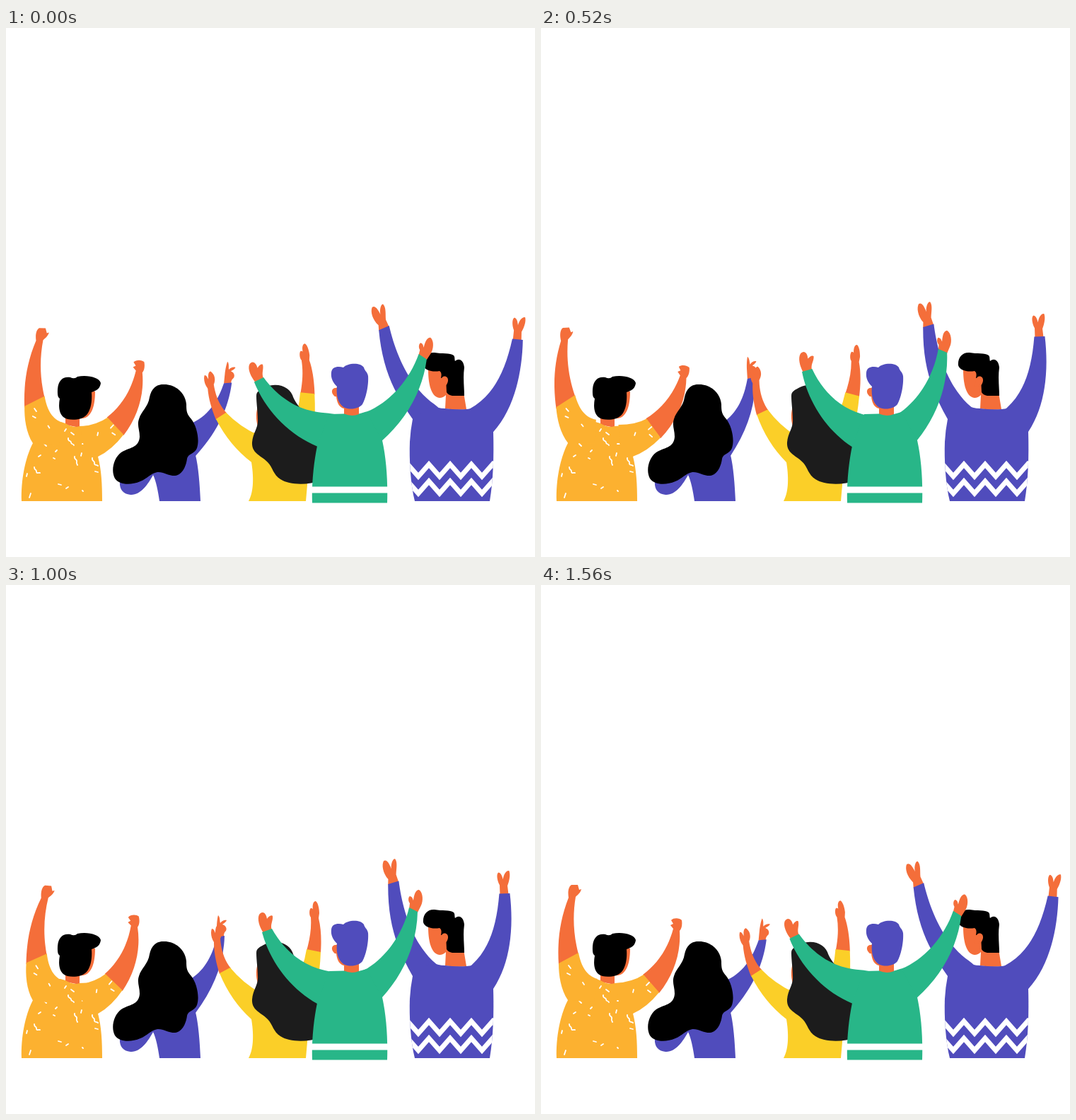
An HTML page for the animation above (1600 ms loop, 748x748 px).

```html
<!DOCTYPE html>
<html lang="en">
<head>
<meta charset="utf-8">
<title>Cheering crowd</title>
<style>
  html, body { margin: 0; width: 100%; height: 100%; overflow: hidden; background: #fff; }
  svg { display: block; width: 100vw; height: 100vh; }
  .skin { fill: #f46e3a; }
  .amber { fill: #fcb130; }
  .purple { fill: #504cbc; }
  .yellow { fill: #fbcf28; }
  .green { fill: #28b688; }
  .dark { fill: #1c1c1c; }
  .confetti { fill: none; stroke: #fff; stroke-width: 1.8; stroke-linecap: round; }
  .zigzag { fill: none; stroke: #fff; stroke-width: 7; }
</style>
</head>
<body>
<!-- data-swing: pivot x, pivot y, amplitude in degrees, delay in ms -->
<svg viewBox="0 0 748 748">
  <defs>
    <path id="sweater" d="M578 669 C572 645 570 610 571 585 Q572 568 575 553 L602 533 Q610 538 621 538 Q636 540 651 539 L660 538 L689 571 C690 605 689 640 684 669Z"/>
    <clipPath id="knit"><use href="#sweater"/></clipPath>
  </defs>

  <g id="zigzag-sweater">
    <g data-swing="574 553 4.65 360">
      <path class="skin" d="M537 425 L537 417 C529 408 527 397 530 391 C535 388 539 397 541 402 C540 395 543 387 546 388 C550 393 548 402 548 410 L552 421Z"/>
      <path class="purple" d="M537 424 L552 419 C557 452 570 500 602 530 Q612 538 618 546 L605 575 L575 553 C551 513 538 478 537 424Z"/>
    </g>
    <g data-swing="686 571 -6.3 360">
      <path class="skin" d="M703 438 L703 425 C699 417 699 408 702 407 C706 408 707 413 708 417 C709 410 713 404 717 405 C719 411 717 419 714 426 L715 438Z"/>
      <path class="purple" d="M702 437 L717 437 C721 484 715 535 689 571 L660 575 L646 546 Q654 541 660 536 C685 515 697 482 702 437Z"/>
    </g>
    <path class="skin" d="M597 483 C597 503 601 522 613 523 Q618 523 622 519 L621 538 Q636 541 651 539 L647 515 L620 483Z"/>
    <use href="#sweater" class="purple"/>
    <g clip-path="url(#knit)">
      <path id="zig" class="zigzag" d="M568 617 l15 17 15-17 15 17 15-17 15 17 15-17 15 17 15-17 15 17"/>
      <use href="#zig" y="24"/>
    </g>
    <path d="M590 477 C589 465 597 458 606 459 C616 461 628 459 633 463 C635 465 634 468 635 471 C641 466 647 470 648 480 C646 495 648 508 648 520 L631 520 Q625 519 623 515 L622 495 L615 495 C616 490 616 487 613 485 C603 487 592 484 590 477Z"/>
    <path class="skin" d="M625 499 C626 491 616 490 615 498 L613 506 C618 510 624 506 625 499Z"/>
  </g>

  <g id="confetti-shirt">
    <path class="skin" d="M84 545 L84 561 L104 565 L104 552 C118 554 126 540 126 514 L100 512Z"/>
    <path d="M73 517 C72 500 79 492 91 494 Q97 497 101 493 C115 490 132 494 134 502 C133 510 128 513 121 515 C122 528 120 540 114 547 C107 555 88 556 81 550 C75 545 74 535 76 524 Q73 522 73 517Z"/>
    <path class="amber" d="M22 669 C21 640 27 608 38 587 C42 570 60 556 77 557 L84 559 Q95 566 104 563 L125 562 L133 598 L130 606 C135 625 136 645 136 669Z"/>
    <path class="confetti" d="M54 565 l-1 4 M88 580 c-1 5 4 3 4 6 s4 2 4 4 M92 572 l4 3 M72 597 l-2 2 M54 588 l3 3 M49 604 l-3 2 M97 606 c-1 5 4 3 3 7 s1 3 1 5 M108 588 l6 0 M107 601 l-1 4 M117 573 l4 4 M122 608 c-1 5 4 4 3 7 s4 3 5 4 M126 627 l4 1 M85 651 l3-2 M35 658 l-2 6 M74 645 l4 1 M108 654 l1 1 M30 630 l-1 4 M40 621 c0 5 3 2 3 6 s4 1 5 2 M67 608 l2 1 M85 567 l-2 3"/>
    <g data-swing="38 583 4.6 160">
      <path class="skin" d="M25 537 C23 506 26 475 39 442 C38 436 38 427 43 424 L52 424 L54 431 L57 430 C56 435 52 438 49 441 C45 465 45 492 53 522Z"/>
      <path class="amber" d="M25 535 L53 520 C57 540 65 553 80 557 L75 590 L38 587 C28 572 25 552 25 535Z"/>
      <path class="confetti" d="M39 538 l3 4 M37 549 l4 2 M59 562 l2 3"/>
    </g>
    <g data-swing="131 602 -5.2 160">
      <path class="skin" d="M144 551 C163 537 179 516 187 486 L183 481 L187 479 L184 474 C188 470 196 471 199 474 C200 480 199 486 196 489 C198 518 189 550 167 577Z"/>
      <path class="amber" d="M145 551 L167 576 Q150 597 130 606 L110 590 L106 563 Q130 561 145 551Z"/>
      <path class="confetti" d="M131 572 l-1 4 M149 566 l4-4 M151 573 l4 3"/>
    </g>
  </g>

  <g id="pointing-friend">
    <g data-swing="260 600 5.8 0">
      <path class="skin" d="M298 498 L298 485 C298 478 299 470 300 467 C303 470 302 475 303 478 C305 475 309 473 312 474 C311 477 307 479 306 480 C310 481 313 485 311 489 C308 492 308 494 308 498Z"/>
      <path class="purple" d="M298 498 L309 496 C308 535 294 570 268 605 L245 600 L245 565 C278 553 291 527 298 498Z"/>
    </g>
    <path class="purple" d="M217 669 C215 655 212 640 208 632 C201 645 190 661 176 660 C164 659 160 651 161 640 L200 610 L240 560 L268 604 C272 620 274 645 275 669Z"/>
    <path d="M222 504 C240 503 254 517 255 532 C255 543 256 546 262 553 C270 563 274 583 270 594 C267 602 257 602 256 609 C255 618 250 632 239 633 C228 633 222 627 214 628 C204 630 200 637 190 641 C176 647 160 646 154 637 C148 626 152 608 163 600 C174 593 188 594 189 578 C189 568 185 562 188 553 C191 542 201 536 203 522 C205 512 211 504 222 504Z"/>
  </g>

  <g id="yellow-top">
    <g data-swing="347 612 -4.8 0">
      <path class="skin" d="M294 505 C290 499 289 491 291 486 C294 486 295 490 296 492 C296 486 297 481 300 481 C305 485 307 492 303 500 C304 516 309 531 318 542 L302 550 C297 534 294 520 294 505Z"/>
      <path class="yellow" d="M302 549 L317 541 Q334 562 360 577 L365 620 L347 614 Q318 588 302 549Z"/>
    </g>
    <g data-swing="422 612 -5.3 0">
      <path class="skin" d="M425 517 C430 500 432 485 431 470 C428 466 429 458 431 457 C434 457 434 459 434 460 C433 454 434 447 438 447 C442 450 443 460 443 464 L442 471 C446 487 446 505 445 520Z"/>
      <path class="yellow" d="M425 515 L445 519 Q444 545 439 575 L405 570 Q421 542 425 515Z"/>
    </g>
    <path class="yellow" d="M343 669 C351 655 350 632 347 614 L350 572 L430 600 L424 669Z"/>
    <path class="skin" d="M357 533 C353 542 353 554 356 563 L366 555Z"/>
    <path class="dark" d="M354 520 C354 513 361 511 366 508 C382 501 399 506 405 519 C410 535 430 550 440 570 L446 640 C425 647 400 646 388 638 C378 632 377 621 370 614 C362 605 347 602 348 586 C349 572 357 566 356 553 C356 543 354 530 354 520Z"/>
  </g>

  <g id="striped-sweater">
    <g data-swing="437 590 -6.75 0">
      <path class="skin" d="M364 492 C358 483 355 472 358 466 C362 460 368 463 369 472 C371 469 375 466 377 468 C378 475 373 480 376 488Z"/>
      <path class="green" d="M362 491 L376 486 C391 513 415 537 451 545 Q462 547 471 550 L475 575 L440 592 C402 571 373 532 362 491Z"/>
    </g>
    <g data-swing="530 583 6.25 0">
      <path class="skin" d="M570 458 L571 450 C568 446 569 441 571 440 C575 441 575 444 576 446 C577 438 579 431 584 431 C590 435 590 447 587 453 L582 463Z"/>
      <path class="green" d="M570 456 L582 462 C581 508 562 550 532 583 L500 580 L490 551 Q502 547 511 542 C541 523 562 490 570 456Z"/>
    </g>
    <path class="skin" d="M467 509 C461 508 459 515 463 519 Q465 522 467 521 C468 531 472 537 478 538 L478 548 L499 549 L499 530 L475 500Z"/>
    <path class="green" d="M433 671.5 C432 645 435 615 440 591 L457 546 L478 545.5 Q489 550 499 546 L510 543 L532 583 C538 610 540 642 539 671.5Z"/>
    <path fill="#fff" d="M432 648.5h109v9h-109z"/>
    <path class="purple" d="M460 487 C461 479 469 478 477 480 C482 474 501 472 506 480 C507 485 511 486 512 492 C513 505 509 523 504 532 C498 540 480 541 474 533 C468 526 467 516 468 507 C463 502 459 496 460 487Z"/>
  </g>
</svg>
<script>
  const PERIOD = 800, STEP = 40;
  const arms = [...document.querySelectorAll('[data-swing]')].map(el => [el, ...el.dataset.swing.split(' ').map(Number)]);

  function draw(now) {
    const time = Math.floor(now / STEP) * STEP;
    for (const [el, x, y, amplitude, delay] of arms) {
      const angle = amplitude * Math.cos(2 * Math.PI * (time - delay) / PERIOD);
      el.setAttribute('transform', `rotate(${angle} ${x} ${y})`);
    }
  }

  function tick() {
    draw(performance.now());
    requestAnimationFrame(tick);
  }
  draw(0);
  requestAnimationFrame(tick);
</script>
</body>
</html>
```
